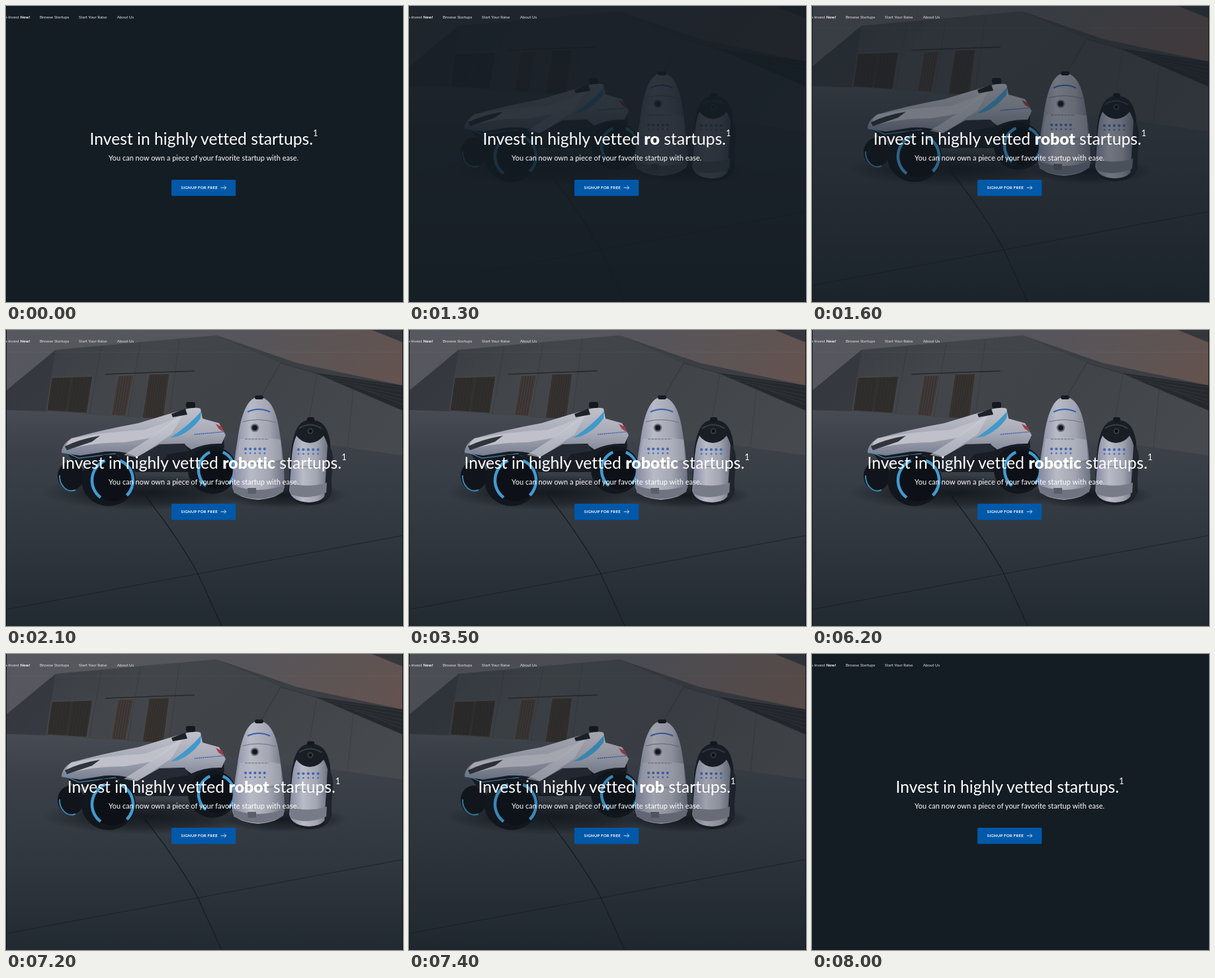
Animation of 600 by 448 pixels, one loop 8100 ms. Source, as an HTML page:

```html
<!DOCTYPE html>
<html lang="en">
<head>
<meta charset="utf-8">
<title>Startup landing page</title>
<style>
  html, body { margin: 0; width: 100%; height: 100%; overflow: hidden; background: #141c24; }
  svg { display: block; width: 100vw; height: 100vh; }
  text { font-family: Lato, "Open Sans", sans-serif; font-variant-ligatures: none; fill: #fff; }
  .nav text { font-size: 6.2px; fill: #e2e5e8; }
  .bold { font-weight: 700; }
</style>
</head>
<body>
<svg viewBox="0 0 600 448">
  <defs>
    <linearGradient id="sky" x2="1" y2=".3">
      <stop stop-color="#57585f"/><stop offset=".55" stop-color="#55555b"/><stop offset="1" stop-color="#64534f"/>
    </linearGradient>
    <linearGradient id="wall" x2="1" y2=".4">
      <stop stop-color="#373b41"/><stop offset=".5" stop-color="#42464b"/><stop offset="1" stop-color="#404449"/>
    </linearGradient>
    <linearGradient id="slab" x2="1" y2=".5">
      <stop stop-color="#3f4348"/><stop offset="1" stop-color="#46494d"/>
    </linearGradient>
    <linearGradient id="ground" x2="0" y2="1">
      <stop stop-color="#484d55"/><stop offset=".2" stop-color="#3c4149"/><stop offset=".6" stop-color="#30373e"/><stop offset="1" stop-color="#222a31"/>
    </linearGradient>
    <linearGradient id="car" x2="0" y2="1">
      <stop stop-color="#c0c1ca"/><stop offset=".5" stop-color="#a8abb7"/><stop offset="1" stop-color="#737a8c"/>
    </linearGradient>
    <linearGradient id="shell" x2="1">
      <stop stop-color="#8387a0"/><stop offset=".35" stop-color="#b9bbc6"/><stop offset=".7" stop-color="#a3a6b2"/><stop offset="1" stop-color="#6b7080"/>
    </linearGradient>
    <radialGradient id="shade">
      <stop stop-color="#0d1117" stop-opacity=".8"/><stop offset=".6" stop-color="#0d1117" stop-opacity=".45"/><stop offset="1" stop-color="#0d1117" stop-opacity="0"/>
    </radialGradient>
  </defs>

  <rect width="600" height="448" fill="#141c24"/>

  <g id="scene" opacity="0">
    <rect width="600" height="200" fill="url(#sky)"/>
    <rect y="115" width="600" height="333" fill="url(#ground)"/>

    <!-- concrete building -->
    <path d="M553 0H600V19Z" fill="#35373d"/>
    <path d="M318 8L440 50L600 84V122L415 60Z" fill="#3b3e43"/>
    <path d="M462 64L600 84V122L530 92Z" fill="#25292e"/>
    <g id="steps" stroke="#33353a" stroke-width="1"></g>
    <path d="M0 92L75 30L318 8L415 50L352 158L240 136L60 123L0 121Z" fill="url(#wall)"/>
    <path d="M0 92L75 30L60 123L0 121Z" fill="#31353b" opacity=".6"/>
    <path d="M415 50L470 66L600 122V190L490 174L352 158Z" fill="url(#slab)"/>
    <g fill="none" stroke="#2c3036" stroke-width=".8">
      <path d="M415 50L352 158M415 50L470 66L600 122"/>
      <path d="M144 25L126 127M203 19L184 131M262 14L246 137M470 66L452 170M525 90L516 178" opacity=".5"/>
    </g>
    <path d="M150 67L285 62" stroke="#25282c" stroke-width="1.6"/>
    <g stroke="#55504e" stroke-width=".7">
      <path d="M69 72L131 70L122 126L62 122Z" fill="#302d2d"/>
      <path d="M169 69L193 68L181 131L159 129Z" fill="#403a38"/>
      <path d="M216 67L247 66L238 135L206 133Z" fill="#36322f"/>
      <path d="M100 71L92 124"/>
    </g>
    <g id="slats" stroke="#292728" stroke-width=".6"></g>

    <!-- ground joints -->
    <g fill="none" stroke="#181d22">
      <path d="M210 250L240 290Q275 340 290 369L326 448" stroke-width="1.4"/>
      <path d="M0 423L290 369L600 311" opacity=".75"/>
    </g>
    <ellipse cx="215" cy="246" rx="160" ry="27" fill="url(#shade)"/>
    <ellipse cx="420" cy="250" rx="95" ry="20" fill="url(#shade)"/>

    <!-- vehicle -->
    <ellipse cx="98" cy="221" rx="20" ry="22" fill="#11151b"/>
    <path d="M81 220A18 22 0 0 0 105 242" fill="none" stroke="#3a86b4" stroke-width="2"/>
    <path d="M88 180L190 160L328 152L330 178L290 215H196L170 190L105 204Z" fill="#181c24"/>
    <path d="M84 186Q84 173 99 164Q145 151 200 141L243 128L271 120Q288 116 294 119L297 134L322 141L332 159L326 172Q300 171 280 181L268 172L235 174L199 193Q181 182 150 184L112 190Z" fill="url(#car)"/>
    <path d="M99 164Q150 154 210 151L268 130L220 163L180 170Q130 170 94 181Q87 174 99 164Z" fill="#bfc0c9"/>
    <path d="M89 176Q112 165 142 160L130 169L92 182Z" fill="#30343c"/>
    <path d="M178 189L222 161L271 122L250 158L199 193Z" fill="#cccdd5" opacity=".6"/>
    <path d="M248 163Q275 146 295 123L294 134Q280 153 260 161Z" fill="#4199ca"/>
    <path d="M195 194L232 173L270 172L277 183L245 188L230 207L200 213Z" fill="#252a34"/>
    <path d="M250 127L271 119L274 128L252 132Z" fill="#1d2128"/>
    <rect x="272" y="109" width="14" height="9" rx="3" fill="#15191f"/>
    <path d="M317 142L327 147L328 154L321 149Z" fill="#a63c42"/>
    <path d="M285 158L330 154" stroke="#3459a6" stroke-width="1.4" stroke-dasharray="2 1"/>
    <path d="M87 184L110 194L166 187" fill="none" stroke="#4a9ccb" stroke-width="1.2"/>
    <g id="wheels"></g>

    <!-- tall robot -->
    <path d="M382 101C361 103 354 138 350 166Q343 205 342 238Q345 254 381 257Q417 254 421 238Q421 200 414 158C410 128 402 103 382 101Z" fill="url(#shell)"/>
    <path d="M343 235Q380 249 421 235L419 245Q382 266 344 246Z" fill="#707481"/>
    <path d="M353 165Q384 160 415 166L417 196Q382 204 348 197Z" fill="#b8bac6" opacity=".5"/>
    <path d="M365 124Q382 116 399 124" fill="none" stroke="#3c60ae" stroke-width="2.2"/>
    <path d="M358 139Q382 132 408 140M350 198Q382 207 418 198" fill="none" stroke="#6e727c" stroke-width="1"/>
    <rect x="376" y="99" width="13" height="6" rx="3" fill="#171a20"/>
    <circle cx="376" cy="148" r="6.3" fill="#6a6f7a"/>
    <circle cx="376" cy="148" r="4" fill="#14181e"/>
    <path d="M361 165H397" stroke="#666b77" stroke-width="1" stroke-dasharray="4 1"/>
    <path d="M365 239H378V248H366Z" fill="#5a5f6b"/>

    <!-- short robot -->
    <path d="M459 136C439 137 434 160 431 182L427 243Q430 264 459 265Q488 264 492 243L490 170C486 146 478 136 459 136Z" fill="#191d24"/>
    <path d="M439 160Q434 169 432 190L428 243Q432 260 458 261Q484 260 485 241L487 178Q484 166 480 160Q471 171 459 171Q446 170 439 160Z" fill="url(#shell)"/>
    <path d="M486 174Q497 180 493 213L490 250L481 258Z" fill="#20252d"/>
    <path d="M429 231Q455 240 485 231L484 246Q455 259 430 248Z" fill="#777b87"/>
    <rect x="455" y="132" width="11" height="7" rx="3" fill="#15181e"/>
    <path d="M443 149Q459 138 477 149" fill="none" stroke="#383e47" stroke-width="2"/>
    <circle cx="460" cy="153" r="4.5" fill="#343a45"/>
    <circle cx="460" cy="153" r="2.4" fill="#080b10"/>
    <path d="M434 204Q459 210 486 204" fill="none" stroke="#747984" stroke-width="1"/>
    <g id="lamps" fill="#3f68b4"></g>

    <path d="M0 33.5H600" stroke="#fff" opacity=".03"/>
    <path d="M.5 0V448M599.5 0V448" stroke="#10151b"/>
  </g>

  <g class="nav">
    <text x="20" y="18.5" text-anchor="end">o-Invest</text>
    <text x="21.6" y="18.5" class="bold" style="fill:#fff">New!</text>
    <text x="51" y="18.5">Browse Startups</text>
    <text x="110" y="18.5">Start Your Raise</text>
    <text x="167.7" y="18.5">About Us</text>
  </g>

  <text x="299" y="210" font-size="24.7" text-anchor="middle">Invest in highly vetted <tspan id="word" font-weight="900"></tspan><tspan id="tail">startups.</tspan><tspan dy="-13" font-size="12.8">1</tspan></text>
  <text x="298.6" y="234" font-size="11" text-anchor="middle">You can now own a piece of your favorite startup with ease.</text>

  <rect x="250" y="263" width="97.3" height="24.5" rx="1.5" fill="#0058a9"/>
  <text x="264.6" y="277.3" font-size="6.1" letter-spacing=".22" class="bold">SIGNUP FOR FREE</text>
  <path d="M324.5 275H332.5M329.8 272.2L332.6 275L329.8 277.8" fill="none" stroke="#fff" stroke-width=".8"/>
</svg>

<script>
const $ = id => document.getElementById(id);
const LOOP = 8100, STEP = 100, WORD = 'robotic';

function add(parent, tag, attrs) {
  const el = document.createElementNS('http://www.w3.org/2000/svg', tag);
  for (const k in attrs) el.setAttribute(k, attrs[k]);
  $(parent).append(el);
}

// tyre seen at an angle, with a glowing rim that is dark at the top and bottom
function wheel(cx, cy, rx, ry) {
  add('wheels', 'ellipse', { cx: cx - 6, cy, rx: rx + 10, ry: ry + 7, fill: '#12161d' });
  add('wheels', 'ellipse', { cx, cy, rx, ry, fill: '#0d1117' });
  const arc = (side, from, to) => {
    const at = a => `${cx + side * rx * Math.cos(a)} ${cy + ry * Math.sin(a)}`;
    add('wheels', 'path', {
      d: `M${at(from)}A${rx} ${ry} 0 0 ${side > 0 ? 1 : 0} ${at(to)}`,
      fill: 'none', stroke: '#419bd0', 'stroke-width': 4.5
    });
  };
  arc(-1, -1.2, .95);
  arc(1, -1.2, .8);
}

function lamps(x, y, count, gap) {
  for (let i = 0; i < count; i++)
    for (let row = 0; row < 2; row++)
      add('lamps', 'circle', { cx: x + i * gap, cy: y + row * 6.5, r: row ? 1.3 : 2.1 });
}

function slats(x, y, w, h, lean, count) {
  for (let i = 1; i < count; i++) {
    const px = x + w * i / count;
    add('slats', 'path', { d: `M${px} ${y}L${px - lean} ${y + h}` });
  }
}

wheel(161, 227.5, 31, 32);
wheel(318, 212, 27, 29);
lamps(362, 180, 5, 7.2);
lamps(442, 181, 5, 7.4);
slats(69, 72, 62, 50, 8, 12);
slats(169, 70, 23, 58, 10, 6);
slats(217, 68, 29, 64, 9, 8);
for (let i = 0; i < 5; i++)
  add('steps', 'path', { d: `M${470 + i * 19} ${68 + i * 6}L600 ${87 + i * 6.5}` });

const clamp = v => Math.min(1, Math.max(0, v));
const smooth = v => v * v * (3 - 2 * v);

function fade(t) {
  if (t < 7200) return clamp((t - 900) / 900) ** 2.3;
  return 1 - smooth(clamp((t - 7200) / 800));
}

function letters(t) {
  const typed = clamp((t - 1100) / 700) * 7;
  const erased = clamp((t - 7000) / 700) * 7;
  return Math.round(typed - erased);
}

function draw(now) {
  const t = Math.floor(now % LOOP / STEP) * STEP;
  const word = WORD.slice(0, letters(t));
  $('scene').setAttribute('opacity', fade(t).toFixed(3));
  $('word').textContent = word;
  $('tail').textContent = (word ? ' ' : '') + 'startups.';
}

const start = performance.now();
function tick() {
  draw(performance.now() - start);
  requestAnimationFrame(tick);
}
tick();
</script>
</body>
</html>
```
